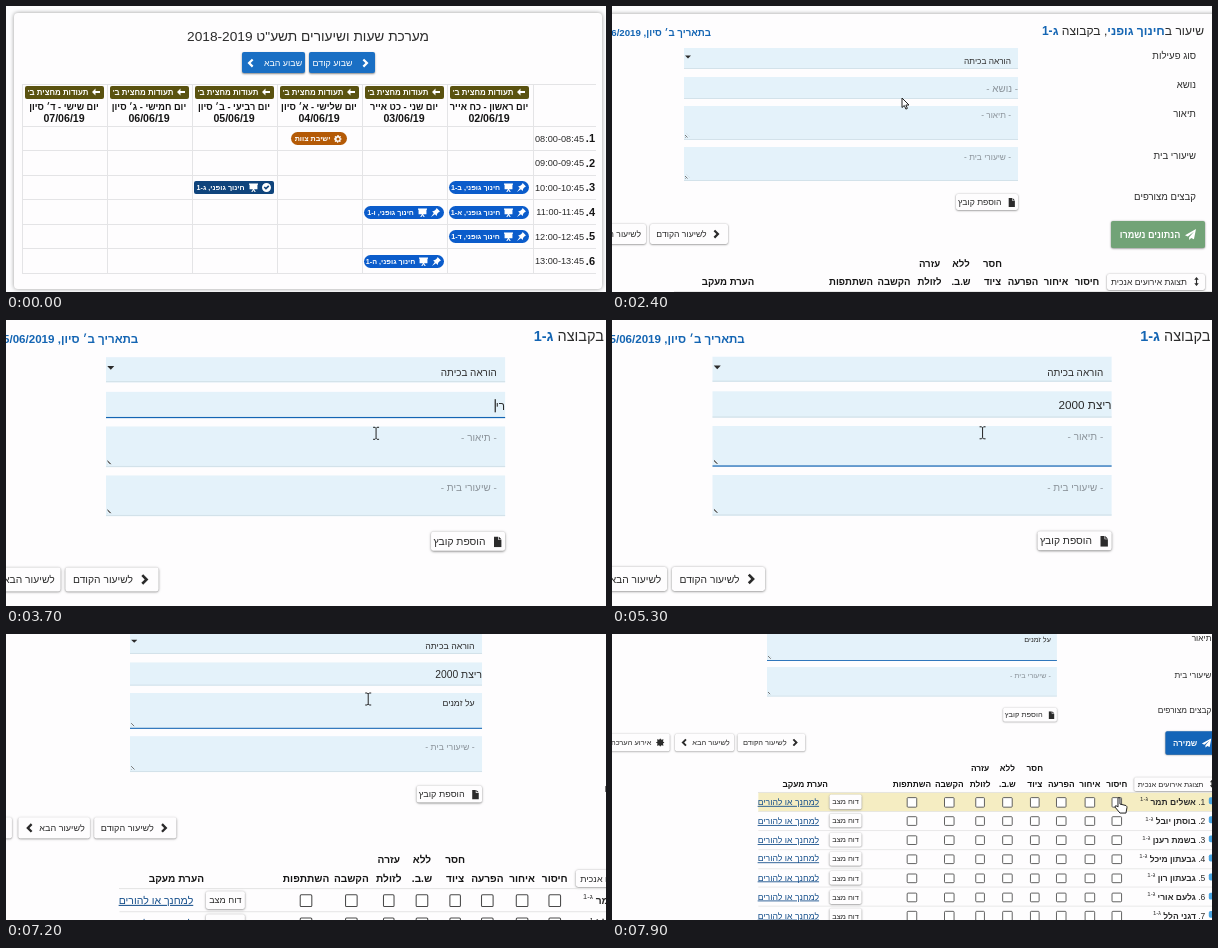
Write an HTML page that moves like this. It is 600x286 px and loops after 8000 ms.

```html
<!DOCTYPE html>
<html lang="he" dir="rtl">
<head>
<meta charset="utf-8">
<title>מערכת שעות</title>
<style>
html, body { margin: 0; width: 100%; height: 100%; overflow: hidden; background: #fdfdfe; }
body { font-family: "Liberation Sans", Arial, sans-serif; color: #2b2b2b; }
#stage { position: absolute; left: 0; top: 0; width: 600px; height: 286px; overflow: hidden; }
#stage div { position: absolute; box-sizing: border-box; }
.page { left: 0; top: 0; width: 600px; height: 286px; }
#form { background: #fdfdfe; }
#world { left: 0; top: 0; width: 600px; height: 286px; transform-origin: 0 0; }
.card { background: #fefdfe; border-radius: 4px; box-shadow: 0 0 4px #999; }
.text { white-space: pre; line-height: 1.2; transform: translate(-100%, -50%); }
.mid { transform: translate(-50%, -50%); }
.bold { font-weight: bold; color: #151515; }
.blue, .text b.blue { color: #1465b3; }
.hint { color: #8a9299; }
.link { color: #17508c; text-decoration: underline; }
.btn, .chip { display: flex; align-items: center; justify-content: center; gap: 5px; white-space: pre; }
.btn { font-size: 8.6px; background: #fefdfe; border-radius: 2px; box-shadow: 0 .5px 2px #777; }
.week { color: #fff; background: #1a6fc4; font-size: 8.9px; gap: 9px; box-shadow: 0 1px 2px #888; }
.save { color: #fff; background: #72a377; font-size: 9.1px; font-weight: bold; gap: 5px; }
.save.dirty { background: #1465b8; }
.chip { color: #fff; font-weight: bold; font-size: 7.2px; background: #0b5ccb; border-radius: 7px; gap: 4px; }
.note { background: #5a5210; border-radius: 2px; font-size: 7.9px; }
.staff { background: #b45a06; }
.done { background: #0f447c; border-radius: 2px; }
.cell { border: solid #e4e4e6; border-width: 0 0 1px 1px; }
.cell.hot { background: #e4e6e8; }
.hour.hot { color: #cf7db4; background: #ececf3; }
.field { background: #e4f2fa; border-bottom: 1px solid #d3e2ea; }
.field.focus { border-bottom: 1.5px solid #1465b3; }
.area::after { content: ""; position: absolute; left: 1px; bottom: 1px; width: 5px; height: 5px;
  background: repeating-linear-gradient(45deg, #777 0 .8px, transparent .8px 2px); clip-path: polygon(0 0, 100% 100%, 0 100%); }
.row { border-bottom: 1px solid #e6e6e6; }
.row.hot { background: #f5edc2; }
.tick { border: 1.5px solid #4a4a4a; border-radius: 1.5px; background: #fff; }
.caret { display: inline-block; width: 1px; height: 1.1em; margin-left: -1px; background: #222; vertical-align: -.2em; }
sup { font-size: 7px; line-height: 0; font-weight: normal; }
svg.icon { fill: currentColor; fill-rule: evenodd; flex: none; }
#pointer { position: absolute; left: 0; top: 0; }
</style>
</head>
<body>
<div id="stage">
  <div id="plan" class="page"></div>
  <div id="form" class="page"><div id="world"></div></div>
  <svg id="pointer" width="600" height="286"><path stroke="#222" stroke-linejoin="round"/></svg>
</div>
<script>
const $ = id => document.getElementById(id);
const plan = $('plan'), world = $('world');

const shapes = {
  right: 'M5 1l7 7-7 7-2.5-2.5L7 8 2.5 3.5z',
  left: 'M11 1L4 8l7 7 2.5-2.5L9 8l4.5-4.5z',
  down: 'M0 4h16l-8 8z',
  back: 'M0 8l7-7v5h9v4H7v5z',
  file: 'M3 0h6v5h5v11H3zM10 0l4 4h-4z',
  plane: 'M16 0L0 9l4 2L13 4 6 12v4l3-3 4 2z',
  board: 'M0 1h16v2h-1v8H9l3 5h-2l-2-3-2 3H4l3-5H1V3H0z',
  pin: 'M10 0l6 6-2 1-3 3-1 4-3-3-7 5 5-7-3-3 4-1 3-3z',
  check: 'M8 0a8 8 0 100 16A8 8 0 108 0zM3 8l2-2 2 2 4-4 2 2-6 6z',
  gear: 'M7 0h2l1 3 3-1 1 2-2 2 3 1v2l-3 1 2 2-2 2-3-1-1 3H7l-1-3-3 1-2-2 2-2-3-1V7l3-1-2-2 2-2 3 1zM8 5a3 3 0 100 6 3 3 0 100-6z',
  updown: 'M8 0l4 5H9v6h3l-4 5-4-5h3V5H4z',
  burst: 'M8 0l2 3 4-1-1 4 3 2-3 2 1 4-4-1-2 3-2-3-4 1 1-4-3-2 3-2-1-4 4 1z'
};
const cursors = {
  arrow: ['M0 0v9.5l2.3-2 1.6 3.6 1.5-.7-1.5-3.4h3.1z', '#fff'],
  beam: ['M-3-6h2l1 1 1-1h2M0-5v10M-3 6h2l1-1 1 1h2', 'none'],
  hand: ['M-1 0q1-1.2 2 0v6l6 1.5q1 .5 1 2l-1 5.5h-6l-5-6q0-2 2-1l1 1z', '#fff']
};

const icon = (name, size = 9) =>
  `<svg class="icon" width="${size}" height="${size}" viewBox="0 0 16 16"><path d="${shapes[name]}"/></svg>`;

function add(parent, cls, html, style) {
  const node = document.createElement('div');
  node.className = cls;
  node.innerHTML = html;
  for (const key in style) node.style[key] = style[key] + 'px';
  parent.append(node);
  return node;
}
const box = (parent, left, top, right, bottom, cls, html = '') =>
  add(parent, cls, html, { left, top, width: right - left, height: bottom - top });
// Anchored at the right edge, or at the centre with class "mid".
const text = (parent, left, top, fontSize, html, cls = '') =>
  add(parent, 'text ' + cls, html, { left, top, fontSize });

// Timetable
const edges = [527, 441, 356, 271, 186, 101, 16];
const headBottom = 120.5, rowStep = 24.5;
const days = ['ראשון - כח אייר', 'שני - כט אייר', 'שלישי - א׳ סיון', 'רביעי - ב׳ סיון', 'חמישי - ג׳ סיון', 'שישי - ד׳ סיון'];
const lessons = [[0, 2, 'ב'], [0, 3, 'א'], [0, 4, 'ד'], [1, 3, 'ו'], [1, 5, 'ה'], [3, 2, 'ג']];
const cells = [];

box(plan, 8, 7, 596, 283, 'card');
text(plan, 302, 30.5, 13.7, 'מערכת שעות ושיעורים תשע"ט 2018-2019', 'mid');
box(plan, 303, 46, 369, 67, 'btn week', icon('right', 10) + 'שבוע קודם');
box(plan, 236, 46, 299, 67, 'btn week', 'שבוע הבא' + icon('left', 10));
box(plan, 16, 78, 590, 79, 'cell');
box(plan, 527, 78, 590, headBottom, 'cell');
days.forEach((day, i) => {
  const x = edges[i + 1], mid = x + 42;
  box(plan, x, 78, edges[i], headBottom, 'cell');
  box(plan, mid - 39.5, 79.5, mid + 39.5, 92.5, 'chip note', icon('back', 8) + "תעודות מחצית ב'");
  text(plan, mid, 101.5, 9.2, 'יום ' + day, 'mid bold');
  text(plan, mid, 111.5, 10.6, `0${i + 2}/06/19`, 'mid bold');
});
for (let r = 0; r < 6; r++) {
  const top = headBottom + r * rowStep, hour = String(r + 8).padStart(2, '0');
  const hourCell = box(plan, 527, top, 590, top + rowStep, 'cell hour');
  text(hourCell, 50, 13, 9.2, `${hour}:00-${hour}:45`);
  text(hourCell, 61, 12.5, 11, `${r + 1}.`, 'bold');
  cells.push([hourCell, ...days.map((_, c) => box(plan, edges[c + 1], top, edges[c], top + rowStep, 'cell'))]);
}
const chipAt = (c, r, half, cls, html) => {
  const x = edges[c + 1] + 41.5, y = headBottom + (r + .5) * rowStep;
  box(plan, x - half, y - 6.5, x + half, y + 6.5, 'chip ' + cls, html);
};
lessons.forEach(([c, r, group]) => chipAt(c, r, 40, c === 3 ? 'done' : '',
  icon(c === 3 ? 'check' : 'pin') + icon('board') + `חינוך גופני, ${group}-1`));
chipAt(2, 0, 28, 'staff', icon('gear', 8) + 'ישיבת צוות');

// Lesson form
box(world, -122, 8, 606, 560, 'card');
text(world, 592, 25.3, 12.1, 'שיעור ב<b class="blue">חינוך גופני</b>, בקבוצה <b class="blue">ג-1</b>');
text(world, 99, 26.5, 9.7, 'בתאריך ב׳ סיון, 05/06/2019', 'bold blue');
[['סוג פעילות', 50], ['נושא', 79], ['תיאור', 107.5], ['שיעורי בית', 149.5], ['קבצים מצורפים', 190.5]]
  .forEach(([label, y]) => text(world, 584, y, 9.6, label));
box(world, 72, 42, 406, 63, 'field');
text(world, 399, 55.8, 8.3, 'הוראה בכיתה');
text(world, 79, 52, 6, icon('down', 6));
const subject = box(world, 72, 71, 406, 92.5, 'field');
const details = box(world, 72, 100, 406, 133.5, 'field area');
box(world, 72, 141, 406, 174.5, 'field area');
const subjectText = text(world, 406, 82.7, 9.8, '');
const detailsText = text(world, 399, 110, 8.3, '');
text(world, 399, 152, 8.3, '- שיעורי בית -', 'hint');
box(world, 343.5, 188, 406, 204, 'btn', icon('file') + 'הוספת קובץ');
const saved = box(world, 499, 215, 593, 242, 'btn save');
box(world, 38, 218, 116, 238, 'btn', icon('right', 10) + 'לשיעור הקודם');
box(world, -34, 218, 34, 238, 'btn', 'לשיעור הבא' + icon('left', 10));
box(world, -114, 218, -40, 238, 'btn', icon('burst', 10) + 'אירוע הערכה');
box(world, 495, 267.5, 593, 283.5, 'btn', icon('updown') + 'תצוגת אירועים אנכית');

const columns = [['', 'חיסור', 475], ['', 'איחור', 444], ['', 'הפרעה', 411], ['חסר', 'ציוד', 380.5],
  ['ללא', 'ש.ב.', 349], ['עזרה', 'לזולת', 317.5], ['', 'הקשבה', 282], ['', 'השתתפות', 239], ['', 'הערת מעקב', 116]];
columns.forEach(([upper, lower, x]) => {
  text(world, x, 257.5, 9.6, upper, 'mid bold');
  text(world, x, 275.5, 9.6, lower, 'mid bold');
});
box(world, 62, 285, 600, 286.2, 'row').style.background = '#cfcfcf';

const pupils = ['אשלים תמר', 'בוסתן יובל', 'בשמת רענן', 'גבעתון מיכל', 'גבעתון רון', 'גלעם אורי', 'דגני הלל'];
const rows = pupils.map((name, i) => {
  const top = 286 + i * 21.9, mid = 10.8;
  const row = box(world, 62, top, 600, top + 21.9, 'row');
  box(row, 519, 5, 530, 13, '').style.cssText += 'background:#4aa5e2;border-radius:2px';
  text(row, 515, mid, 9.8, `${i + 1}. <b>${name}</b> <sup>ג-1</sup>`);
  columns.slice(0, 8).forEach(c => box(row, c[2] - 67.8, mid - 5.8, c[2] - 56.2, mid + 5.8, 'tick'));
  box(row, 82, 2, 119, 18.5, 'btn', 'דוח מצב');
  text(row, 70, mid, 10, 'למחנך או להורים', 'link');
  return row;
});

// Keys: [time, values..., power]; a negative power eases out.
function at(keys, t) {
  const next = keys.findIndex(k => k[0] > t);
  if (next === 0) return keys[0].slice(1, -1);
  if (next < 0) return keys[keys.length - 1].slice(1, -1);
  const a = keys[next - 1], b = keys[next], power = b[b.length - 1];
  const u = (t - a[0]) / (b[0] - a[0]);
  const e = power > 0 ? u ** power : 1 - (1 - u) ** -power;
  return a.slice(1, -1).map((v, i) => v + (b[i + 1] - v) * e);
}
// Zoom, then where the details field's corner lands on the stage.
const camera = [[2000, .807, 165, 81, 1], [2400, 1, 72, 100, 1], [3200, 1.195, 100, 106.5, -2],
  [4400, 1.195, 100, 106.5, 1], [5300, 1.195, 100.5, 106, 1], [6700, 1.195, 100.5, 106, 1],
  [7200, 1.054, 124, 59, 2.5], [7900, .868, 155, -2.6, -1.8]];
const planPath = [[700, 592, 272, 1], [1200, 223.5, 186, -1.4]];
const formPath = [[2000, 144.5, 230, 1], [2400, 290, 92, 1], [2700, 296, 83, 1], [3000, 296, 83, 1],
  [3200, 298, 105.7, 1], [7300, 298, 105.7, 1], [7900, 477.5, 292, -1.5]];
const subjectKeys = [3400, 3700, 3900, 4000, 4200, 4500, 4600, 4700, 4800];
const detailKeys = [5600, 5700, 5800, 6000, 6100, 6300, 6400, 6500];

function type(node, value, keys, t, hint, focused) {
  const count = keys.filter(k => k <= t).length;
  node.classList.toggle('hint', !count);
  node.innerHTML = count ? value.slice(0, count) + (focused ? '<i class="caret"></i>' : '') : hint;
}

function pickCursor(t) {
  if (t < 2000) return t >= 1200 ? 'hand' : 'arrow';
  if (t >= 7800) return 'hand';
  return t > 2400 && t < 7400 ? 'beam' : 'arrow';
}

function render(t) {
  const [zoom, left, top] = at(camera, t);
  const dx = left - 72 * zoom, dy = top - 100 * zoom;
  world.style.transform = `translate(${dx}px, ${dy}px) scale(${zoom})`;
  $('form').style.opacity = Math.max(0, Math.min(1, (t - 1300) / 400));

  const onForm = t >= 2000;
  const [px, py] = at(onForm ? formPath : planPath, t);
  const x = onForm ? px * zoom + dx : px, y = onForm ? py * zoom + dy : py;
  const [shape, fill] = cursors[pickCursor(t)];
  const path = $('pointer').firstChild;
  path.setAttribute('d', shape);
  path.setAttribute('fill', fill);
  path.setAttribute('transform', `translate(${x} ${y})`);
  $('pointer').style.visibility = t < 700 ? 'hidden' : 'visible';

  const hotRow = t >= 700 && t < 2000 ? Math.floor((py - headBottom) / rowStep) : -1;
  const hotCell = edges.findIndex(edge => px >= edge);
  cells.forEach((line, r) => line.forEach((cell, c) =>
    cell.classList.toggle('hot', r === hotRow && (c === 0 || c === hotCell))));
  rows.forEach((row, i) => row.classList.toggle('hot', onForm && Math.floor((py - 286) / 21.9) === i));

  const inSubject = t >= 3000 && t < 5000, inDetails = t >= 5000;
  subject.classList.toggle('focus', inSubject);
  details.classList.toggle('focus', inDetails);
  type(subjectText, 'ריצת 2000', subjectKeys, t, '- נושא -', inSubject);
  type(detailsText, 'על זמנים', detailKeys, t, '- תיאור -', inDetails && t < 7000);

  const dirty = t >= 3400;
  saved.classList.toggle('dirty', dirty);
  saved.style.left = (dirty ? 530.5 : 499) + 'px';
  saved.style.width = (dirty ? 62.5 : 94) + 'px';
  saved.innerHTML = icon('plane', 11) + (dirty ? 'שמירה' : 'הנתונים נשמרו');
}

let last = -1;
function tick() {
  const t = Math.floor(performance.now() % 8000 / 100) * 100;
  if (t !== last) render(last = t);
  requestAnimationFrame(tick);
}
tick();
</script>
</body>
</html>
```
